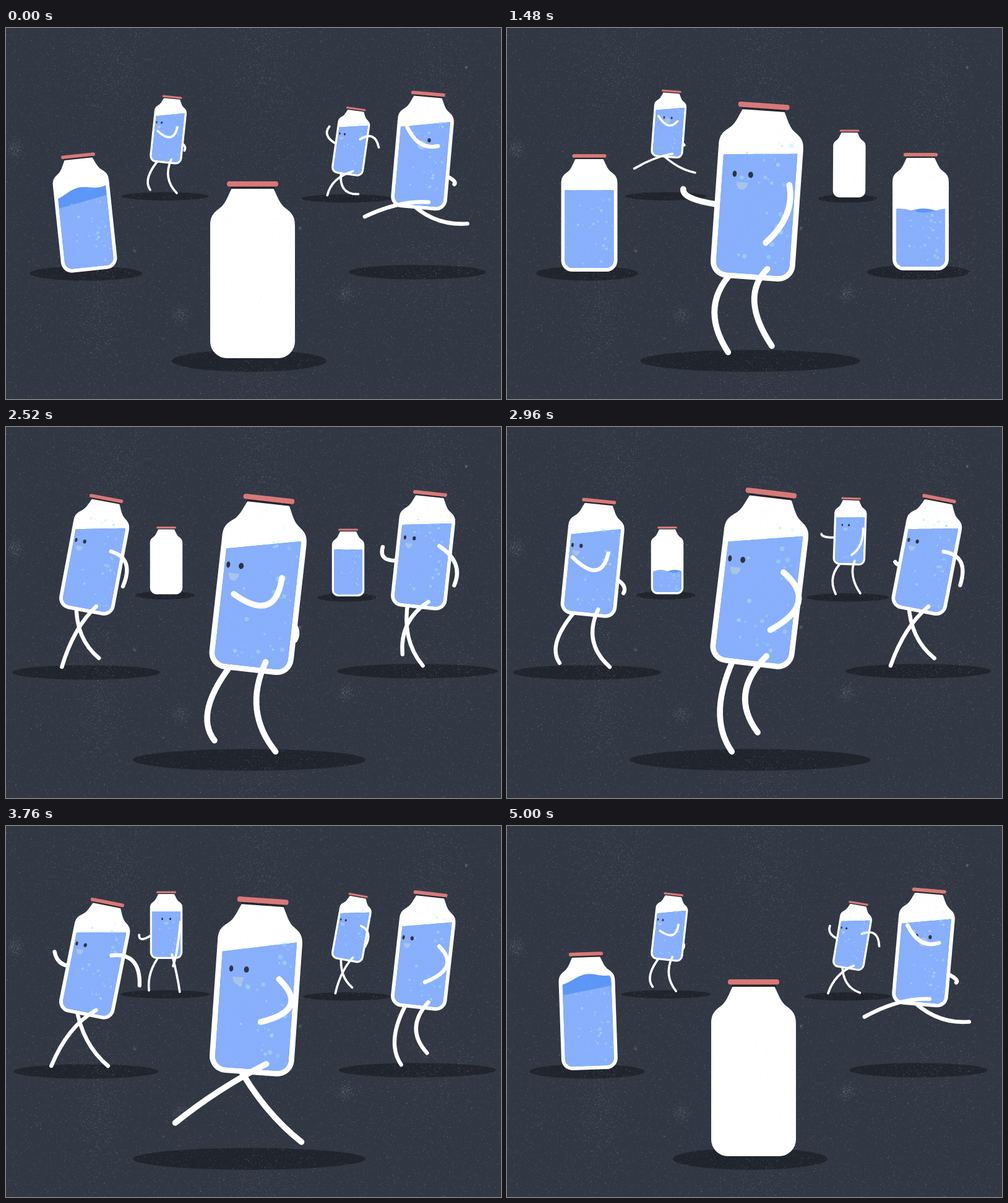
Write an HTML page with a canvas that moves like this. It is 800x600 px and loops after 5.04 s.

```html
<!DOCTYPE html>
<html lang="en">
<head>
<meta charset="utf-8">
<title>Running bottles</title>
<style>
html, body { margin: 0; width: 100%; height: 100%; overflow: hidden; background: #313843; }
canvas { display: block; width: 800px; height: 600px; }
</style>
</head>
<body>
<canvas id="stage" width="800" height="600"></canvas>
<script>
const LOOP = 5040, STEP = 40, TAU = 2 * Math.PI;
const ctx = document.getElementById('stage').getContext('2d');
const { sin, cos, max, min, floor } = Math;
const mix = (a, b, k) => a + (b - a) * k;
const clamp = v => max(0, min(1, v));
const stride = t => TAU * (t - 1960) / 1440;

function random(seed) {
  return () => {
    seed = (seed + 0x6D2B79F5) | 0;
    let n = Math.imul(seed ^ seed >>> 15, 1 | seed);
    n = n + Math.imul(n ^ n >>> 7, 61 | n) ^ n;
    return ((n ^ n >>> 14) >>> 0) / 4294967296;
  };
}

// Smooth interpolation of rows [time, ...values] without overshoot
function track(rows) {
  const last = rows.length - 1;
  const rate = (i, c) => (rows[i + 1][c] - rows[i][c]) / (rows[i + 1][0] - rows[i][0]);
  const tangent = (i, c) => {
    if (i === 0 || i === last) return 0;
    const a = rate(i - 1, c), b = rate(i, c);
    return a * b <= 0 ? 0 : 2 * a * b / (a + b);
  };
  return t => {
    if (t <= rows[0][0]) return rows[0].slice(1);
    if (t >= rows[last][0]) return rows[last].slice(1);
    let i = 0;
    while (rows[i + 1][0] < t) i++;
    const d = rows[i + 1][0] - rows[i][0], u = (t - rows[i][0]) / d, v = 1 - u;
    return rows[i].slice(1).map((p, k) => {
      const c = k + 1;
      return p * (1 + 2 * u) * v * v + rows[i + 1][c] * u * u * (3 - 2 * u)
        + d * (tangent(i, c) * u * v * v - tangent(i + 1, c) * u * u * v);
    });
  };
}

// Poses before and after the walk, with the walk rule sampled between
function pose(before, walk, after, from = 1720) {
  const steps = [];
  for (let t = from; t <= 3400; t += 60) steps.push([t, ...walk(t, stride(t))]);
  return track([...before, ...steps, ...after]);
}

// Height and tilt of the bottle
const body = pose(
  [[1120, 0, 0], [1240, -104, 0], [1280, -145, 0], [1400, -132, 2], [1480, -127, 4], [1720, -150, 6.7]],
  (t, a) => [-140 + 9 * cos(TAU * (t - 1950) / 720), 8.3 + 3 * cos(a - .17)],
  [[3440, -111, 9.5], [3480, -95, 8], [3560, -84, 6], [3760, -132, 4], [3960, -160, 4], [4180, -151, 5],
    [4320, -131, 5], [4360, -117, 5], [4500, 0, 3], [4640, 0, -2], [4680, -2, -6], [4740, -3, -9], [4850, 0, 2], [5000, 0, 0]],
  1840);

// Bottle coordinates to ground coordinates
function toGround(t, x, y) {
  const [by, tilt] = body(t), a = tilt * Math.PI / 180;
  return [x * cos(a) - y * sin(a) - .75 * tilt, x * sin(a) + y * cos(a) + by];
}

const NEAR_HIP = [24, -19], FAR_HIP = [-25, -18], FAR_SHOULDER = [-40, -116];

// Limbs give a middle point and an end point
function legWalk(hip, center, reach, lift, bend) {
  return (t, a) => {
    const [hx, hy] = toGround(t, ...hip);
    const x = center - reach * cos(a), y = -9 - lift * max(0, -sin(a));
    const [kx, ky] = bend(a);
    return [(hx + x) / 2 + kx, (hy + y) / 2 + ky, x, y];
  };
}
const nearWalk = legWalk(NEAR_HIP, -18, 72, 33, a => [-18 + 12 * cos(a - .5), -4 - 10 * cos(a)]);
const farWalk = legWalk(FAR_HIP, -14, 62, 28, a => [-20 - 8 * cos(a), 10]);

const nearLeg = pose(
  [[1240, 17, -71, 57, -17], [1280, 44, -80, 57, -6], [1400, 16, -84, 47, -13]],
  nearWalk,
  [[3480, -52, -72, -88, -9], [3760, -53, -106, -125, -54], [3960, -59, -145, -140, -102],
    [4180, -54, -160, -136, -128], [4320, -28, -154, -82, -146], [4360, -16, -144, -60, -146]]);
const farLeg = pose(
  [[1240, -92, -68, -79, -23], [1280, -65, -90, -73, -12], [1400, -68, -84, -57, -10]],
  (t, a) => farWalk(t, a + Math.PI),
  [[3480, -19, -38, 43, -14], [3760, 22, -79, 79, -23], [3960, 44, -122, 117, -78],
    [4180, 40, -125, 118, -114], [4320, 27, -118, 70, -111], [4360, 31, -110, 52, -104]]);
const nearArm = pose(
  [[1240, 46, -184, 32, -105], [1400, 47, -219, 10, -175]],
  (t, a) => [60 + 49 * cos(a) + 30 * max(0, -cos(a - 1.05)) ** 2, -254 - 10 * cos(a),
    42 + 84 * cos(a + .17), -205 - 72 * max(0, -cos(a + .26)) ** 2],
  [[3480, 102, -256, 129, -211], [3760, 61, -244, 13, -217], [3960, 5, -283, -38, -319],
    [4180, 2, -309, -31, -349], [4320, 10, -298, -18, -326], [4360, 21, -287, -8, -311]]);
const farArm = pose(
  [[1240, -96, -226, -114, -244], [1400, -97, -251, -117, -264], [1840, -70, -273, -78, -307]],
  (t, a) => {
    const x = 3 - 85 * cos(a);
    return [x * .78, -240 - 18 * cos(a), x, -240 - 52 * cos(a + .44)];
  },
  [[3480, -85, -256, -79, -300], [3760, -20, -230, 0, -220], [4180, 65, -231, 87, -209], [4320, 20, -240, 40, -225]],
  1960);

const shadow = pose(
  [[1120, 125], [1240, 162], [1280, 187], [1400, 174]],
  t => [186 - 11 * cos(TAU * (t - 2055) / 650)],
  [[3480, 191], [3760, 188], [3960, 175], [4320, 162.5], [4640, 140], [4880, 125]]);
const slope = pose(
  [[1400, 0]],
  (t, a) => [-.055 + .055 * cos(a)],
  [[3480, -.06], [3760, -.12], [3960, -.08], [4320, -.11], [4640, -.2], [4680, -.28], [4800, .05], [4960, 0]]);
const level = track([[90, 0], [200, 25], [480, 97], [880, 196], [1240, 199], [1720, 207], [4500, 207], [4640, 193], [4680, 169], [4960, 0]]);
const lift = track([[4500, 0], [4640, 33], [4680, 30], [4960, 0]]);
const ripple = track([[480, 6], [880, 2], [1240, 0], [4400, 0], [4640, 7], [4960, 5]]);
const faceX = track([[1300, 0], [1400, -19.5], [1720, -39], [2080, -43], [3480, -43], [3760, -31], [3960, -10], [4180, -4]]);
const shoulderX = track([[1240, 60], [1400, 55], [1720, 35]]);

const runners = [[259, 270.5, .383, 2480], [553, 274, .383, 1560], [133, 394, .664, 360], [668.5, 392, .664, 840], [398.5, 534, 1, 0]];

const rnd = random(11);
const bubbles = Array.from({ length: 34 }, () => ({
  x: -56 + 113 * Math.sqrt(rnd()), u: rnd(), speed: rnd() < .6 ? 1 : 2,
  r: 1.3 + 4.3 * rnd() * rnd(), alpha: .25 + .55 * rnd()
}));

function ellipse(x, y, rx, ry, fill) {
  ctx.fillStyle = fill;
  ctx.beginPath();
  ctx.ellipse(x, y, rx, ry, 0, 0, TAU);
  ctx.fill();
}

function glass(inset) {
  const w = 68.5 - inset, r = 27 - inset, n = 34 - inset * .8, top = -274 + inset, side = -214 + inset * .3;
  ctx.beginPath();
  ctx.moveTo(-n, top);
  ctx.lineTo(n, top);
  ctx.bezierCurveTo(n + 7, top + 14, n + 10, top + 25, n + 20, top + 32);
  ctx.bezierCurveTo(n + 29, top + 39, w, side - 16, w, side);
  ctx.arcTo(w, -inset, 0, -inset, r);
  ctx.arcTo(-w, -inset, -w, -60, r);
  ctx.lineTo(-w, side);
  ctx.bezierCurveTo(-w, side - 16, -n - 29, top + 39, -n - 20, top + 32);
  ctx.bezierCurveTo(-n - 10, top + 25, -n - 7, top + 14, -n, top);
  ctx.closePath();
}

function surface(fill, height) {
  ctx.fillStyle = fill;
  ctx.beginPath();
  ctx.moveTo(-70, 5);
  for (let x = -70; x <= 70; x += 4) ctx.lineTo(x, height(x));
  ctx.lineTo(70, 5);
  ctx.fill();
}

function drawLiquid(t, angle) {
  const [top] = level(t), [back] = lift(t), [amp] = ripple(t);
  if (top < 1) return;
  const lean = slope(t)[0] - Math.tan(angle);
  const wave = x => amp * sin(x / 18.8 + (t - 490) * .008);
  ctx.save();
  glass(9);
  ctx.clip();
  surface('#5c96f6', x => lean * x - top - back - wave(x));
  surface('#87affc', x => lean * x - top + (back > 2 ? 0 : wave(x)));
  const splash = t > 1300 && t < 4600 ? 22 : -6;
  if (top > 20) for (const b of bubbles) {
    const u = (b.u + b.speed * t / LOOP) % 1;
    ctx.globalAlpha = b.alpha * min(1, u * 12, (1 - u) * 8);
    ellipse(b.x, -12 - u * (top + splash), b.r, b.r, '#9fdeeb');
  }
  ctx.restore();
}

function drawFace(t) {
  if (t < 1170 || t > 4490) return;
  const [x] = faceX(t), turn = -x / 43, gap = mix(17, 10.5, turn), open = clamp((t - 3760) / 140);
  ellipse(x - gap, -169, mix(3.8, 3, turn), 5, '#2c3342');
  ellipse(x + gap, -169, 4, 5, '#2c3342');
  const w = mix(mix(10.5, 8.5, turn), 11, open);
  ctx.fillStyle = '#a9c3e9';
  ctx.beginPath();
  ctx.ellipse(x, -156, w, mix(12, 11, open), 0, 0, Math.PI);
  ctx.ellipse(x, -156, w, 11 * open, 0, Math.PI, TAU);
  ctx.fill();
}

function drawRunner(t) {
  const angle = body(t)[1] * Math.PI / 180;
  const grow = clamp((t - 1150) / 90) * clamp((4460 - t) / 80);
  const limb = (path, root) => {
    if (!grow) return;
    const [sx, sy] = toGround(t, ...root);
    const p = path(t).map((v, i) => mix(i % 2 ? sy : sx, v, grow));
    ctx.beginPath();
    ctx.moveTo(sx, sy);
    ctx.quadraticCurveTo(2 * p[0] - (sx + p[2]) / 2, 2 * p[1] - (sy + p[3]) / 2, p[2], p[3]);
    ctx.stroke();
  };
  ctx.strokeStyle = '#fff';
  ctx.lineWidth = 9.6;
  ctx.lineCap = 'round';

  ellipse(-5.5, 4.3, shadow(t)[0], 17.6, '#20252d');
  limb(farLeg, FAR_HIP);
  limb(farArm, FAR_SHOULDER);

  ctx.save();
  ctx.translate(...toGround(t, 0, 0));
  ctx.rotate(angle);
  ctx.fillStyle = '#20242b';
  ctx.fillRect(-35, -278.5, 71, 5);
  glass(0);
  ctx.fillStyle = '#fff';
  ctx.fill();
  drawLiquid(t, angle);
  drawFace(t);
  ctx.fillStyle = '#d97777';
  ctx.beginPath();
  ctx.roundRect(-41.5, -286, 83, 8.5, 4);
  ctx.fill();
  ctx.restore();

  limb(nearLeg, NEAR_HIP);
  limb(nearArm, [shoulderX(t)[0], -157]);
}

function makeGrain() {
  const layer = document.createElement('canvas'), g = layer.getContext('2d'), r = random(5);
  layer.width = 800;
  layer.height = 600;
  const bell = () => r() + r() + r() - 1.5;
  const speck = (x, y) => {
    g.fillStyle = `rgba(205,215,225,${.05 + .17 * r() * r()})`;
    const s = r() < .12 ? 1.6 : 1;
    g.fillRect(floor(x), floor(y), s, s);
  };
  const patch = (x, y, w, h, n) => {
    for (let i = 0; i < n; i++) speck(x + bell() * w, y + bell() * h);
  };
  for (let i = 0; i < 26000; i++) speck(r() * 800, r() * 600);
  patch(150, 440, 45, 130, 1500);
  patch(415, 60, 60, 160, 1700);
  patch(690, 110, 50, 190, 1700);
  patch(690, 410, 70, 80, 800);
  patch(170, 60, 70, 100, 1300);
  patch(410, 570, 60, 60, 700);
  for (const [x, y] of [[14, 195], [283, 465], [550, 430]]) patch(x, y, 16, 15, 280);
  for (const [x, y] of [[208, 360], [475, 324], [744, 64]]) patch(x, y, 3, 3, 40);
  return layer;
}
const grain = makeGrain();

function draw(now) {
  const time = floor((now + .5) / STEP) * STEP % LOOP;
  ctx.setTransform(1, 0, 0, 1, 0, 0);
  ctx.fillStyle = '#313843';
  ctx.fillRect(0, 0, 800, 600);
  for (const [x, y, s, delay] of runners) {
    ctx.setTransform(s, 0, 0, s, x, y);
    drawRunner((time - delay + LOOP) % LOOP);
  }
  ctx.setTransform(1, 0, 0, 1, 0, 0);
  ctx.drawImage(grain, 0, 0);
}

function tick() {
  draw(performance.now());
  requestAnimationFrame(tick);
}
tick();
</script>
</body>
</html>
```
